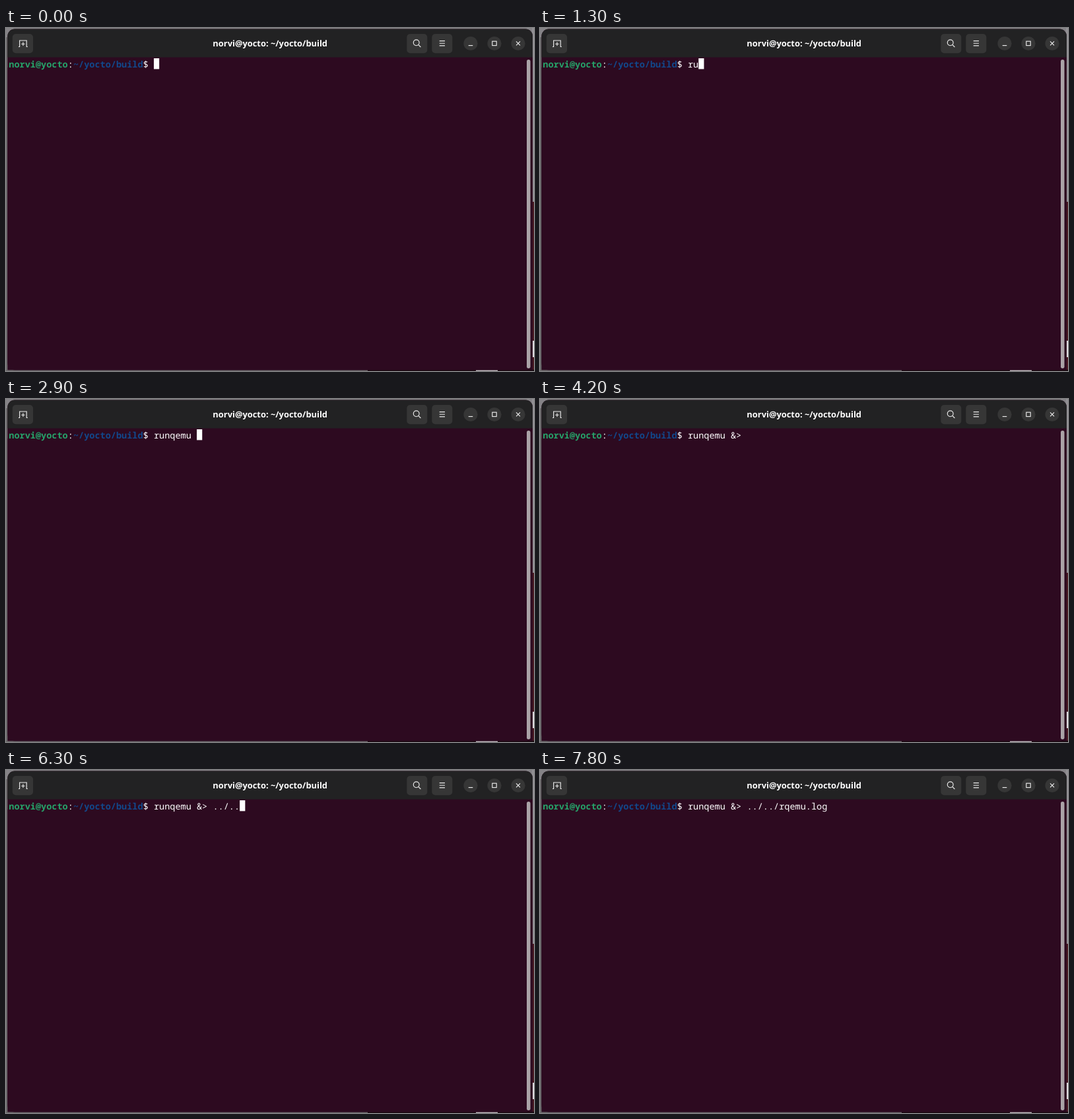
Write an HTML page that moves like this. It is 800 px wide and 521 px high and loops after 8000 ms.

```html
<!DOCTYPE html>
<html lang="en">
<head>
<meta charset="utf-8">
<title>Terminal</title>
<style>
  html, body { margin: 0; width: 100%; height: 100%; overflow: hidden; background: #6b696b; }
  svg { display: block; width: 800px; height: 521px; }
  text { white-space: pre; text-rendering: geometricPrecision; }
  .title { font: 700 12.88px "Open Sans", "Noto Sans", sans-serif; fill: #fff; text-anchor: middle; }
  .mono { font: 13.56px "Noto Sans Mono", "DejaVu Sans Mono", monospace; fill: #fff; }
  .bold { font-weight: 700; }
  .button { fill: #363636; }
  .icon { fill: none; stroke: #ececec; stroke-width: 1.15; }
</style>
</head>
<body>
<svg viewBox="0 0 800 521">
  <!-- desktop behind the window -->
  <rect width="800" height="521" fill="#6b696b"/>
  <rect width="800" height="14" fill="#858387"/>
  <rect x="797" width="3" height="264" fill="#929094"/>
  <rect x="797" y="264" width="3" height="257" fill="#4a1a22"/>
  <rect x="797" y="475" width="3" height="25" fill="#dedcde"/>
  <rect x="548" y="519" width="252" height="2" fill="#17090f"/>
  <rect x="712" y="519" width="33" height="2" fill="#c4c2c4"/>

  <!-- window -->
  <rect x="2.3" y="1.6" width="795.7" height="517.9" fill="#2d0a20" rx="11"/>
  <rect x="2.3" y="60" width="795.7" height="459.5" fill="#2d0a20"/>
  <path d="M2.3 44.5V12.6a11 11 0 0 1 11-11H787a11 11 0 0 1 11 11V44.5Z" fill="#222223"/>
  <rect x="789" y="48" width="5.5" height="469" rx="2.7" fill="#aaa3a7"/>

  <!-- header bar -->
  <g class="button">
    <rect x="9.8" y="9" width="31.2" height="29.3" rx="5"/>
    <rect x="607.3" y="9" width="31" height="29.3" rx="5"/>
    <rect x="645.3" y="9" width="31" height="29.3" rx="5"/>
    <circle cx="704" cy="23.5" r="10.6"/>
    <circle cx="740" cy="23.5" r="10.6"/>
    <circle cx="776" cy="23.5" r="10.6"/>
  </g>
  <g class="icon">
    <path d="M19 28.5H20.6V19H31.2V28.5H32.8M25.9 21.5V26.9M23.2 24.2H28.6"/>
    <circle cx="621.7" cy="22.3" r="4.4"/>
    <path d="M625 25.6L628.4 29"/>
    <path d="M656.7 19.6H665M656.7 23.2H665M656.7 26.8H665"/>
    <path d="M700.7 26.6H707.3"/>
    <rect x="736.8" y="20.2" width="6.4" height="6.4"/>
    <path d="M773 20.4L779 26.4M779 20.4L773 26.4"/>
  </g>
  <text class="title" x="400.2" y="27.8">norvi@yocto: ~/yocto/build</text>

  <g id="line"></g>
  <rect id="cursor" width="8.2" height="16.4" fill="#fff"/>
</svg>
<script>
  const LOOP = 8000, BLINK = 600, FOCUS = 100;
  const LEFT = 4.3, TOP = 46, CELL = 8.136, ROW = 16.6, PROMPT = 27;

  // bursts of typing: text, time of its first key, pause between keys
  const BURSTS = [
    ["ru", 900, 400],
    ["nqemu", 1500, 125],
    [" &>", 2800, 400],
    [" ..", 5300, 200],
    ["/..", 6000, 150],
    ["/r", 6500, 300],
    ["qemu.log ", 6900, 0], // tab completion
    ["\n", 7200, 0]
  ];
  const keys = BURSTS.flatMap(([text, start, pause]) =>
    [...text].map((char, i) => ({ char, time: start + i * pause })));

  const line = document.getElementById("line");
  const cursor = document.getElementById("cursor");
  const colX = col => LEFT + col * CELL;

  function addText(col, content, color, bold) {
    const el = document.createElementNS("http://www.w3.org/2000/svg", "text");
    el.setAttribute("class", bold ? "mono bold" : "mono");
    el.setAttribute("x", colX(col));
    el.setAttribute("y", 59.6);
    el.style.fill = color;
    el.textContent = content;
    return line.appendChild(el);
  }

  addText(0, "norvi@yocto", "#26a269", true);
  addText(11, ":", "#fff");
  addText(12, "~/yocto/build", "#12488b", true);
  addText(25, "$", "#fff");
  const typed = addText(PROMPT, "", "#fff");

  function draw(time) {
    const pressed = keys.filter(key => key.time <= time);
    const text = pressed.map(key => key.char).join("");
    const entered = text.endsWith("\n");
    typed.textContent = text.trimEnd();

    // every key restarts the blinking with the cursor visible
    const idle = Math.max(0, time - (pressed.at(-1)?.time ?? FOCUS));
    const visible = Math.floor(idle / BLINK) % 2 === 0;
    cursor.setAttribute("x", colX(entered ? 0 : PROMPT + text.length));
    cursor.setAttribute("y", entered ? TOP + ROW : TOP);
    cursor.setAttribute("visibility", visible ? "visible" : "hidden");
  }

  const start = performance.now();
  function tick() {
    draw((performance.now() - start) % LOOP);
    requestAnimationFrame(tick);
  }
  tick();
</script>
</body>
</html>
```
